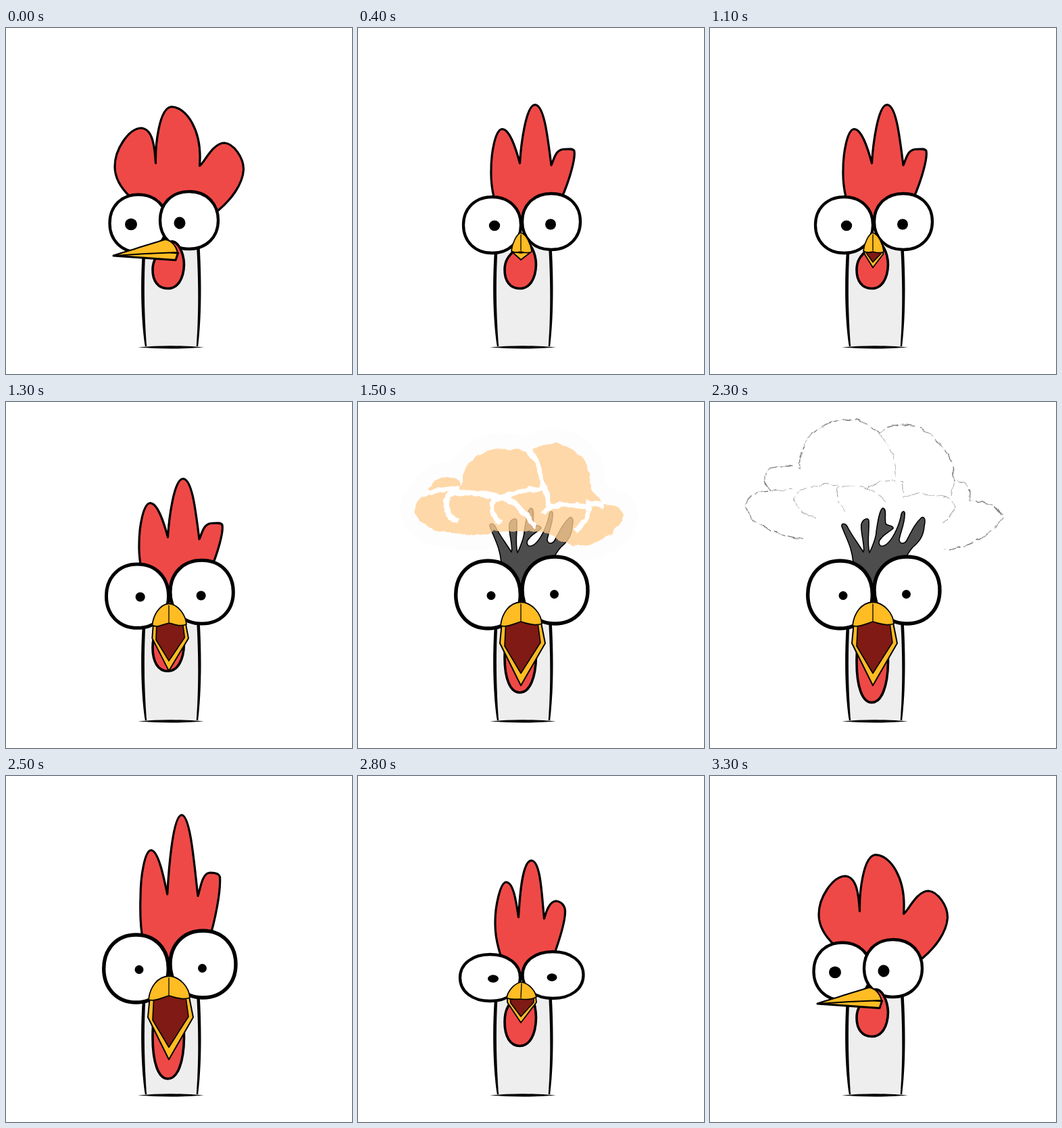
An HTML page for the animation above (4200 ms loop, 512x512 px).

```html
<!DOCTYPE html>
<html lang="en">
<head>
<meta charset="utf-8">
<title>Rooster</title>
<style>
  html, body { margin: 0; width: 100%; height: 100%; overflow: hidden; background: #fff; }
  svg { display: block; width: 100%; height: 100%; }
  .red { fill: #ee4947; stroke: #000; stroke-width: 3.2; stroke-linejoin: round; }
  .beak { fill: #ffbc23; stroke: #000; stroke-linejoin: round; }
  .eye { fill: #fff; stroke: #000; }
  .rim { fill: none; stroke-linejoin: round; }
  #wattle { stroke-width: 3.6; }
  #ridge { fill: none; stroke: #000; stroke-width: 1.3; stroke-linecap: round; }
  #hair { fill: #4d4d4d; stroke: #000; stroke-width: 1.6; stroke-linejoin: round; }
  #mouth { fill: #7f1a14; stroke: #000; stroke-width: 1.6; stroke-linejoin: round; }
</style>
</head>
<body>
<svg viewBox="0 0 512 512">
  <defs>
    <filter id="rough" x="-20%" y="-20%" width="140%" height="140%" color-interpolation-filters="sRGB">
      <feTurbulence type="fractalNoise" baseFrequency=".07" numOctaves="2" seed="4"/>
      <feDisplacementMap in="SourceGraphic" scale="8" xChannelSelector="R" yChannelSelector="G"/>
    </filter>
  </defs>

  <path id="halo" class="rim" stroke="#fdfdfd" stroke-width="46"/>

  <path fill="#eee" d="M204 310 C200 385 202 430 207 471 H283 C287 430 288 385 285 310Z"/>
  <path d="M202 328 C198 390 201 440 205.800 471 L208.200 471 C206 440 203 390 206.500 328Z"/>
  <path d="M286.500 322 C290.500 390 288 440 284.200 471 L281.800 471 C284 440 286 390 282 322Z"/>
  <path d="M195 472.500 Q244 468 293 472.500 Q244 476.500 195 472.500Z"/>

  <path id="comb" class="red"/>
  <path id="hair" d="M212 238 C210 215 203 205 195 184 C194 179 200 179 203 184 C209 196 216 205 227 222
    C230 215 222 190 224 181 C226 173 235 170 235 176 C236 190 232 208 236 223
    C240 215 246 200 246 192 C248 178 251 158 256 157 C262 158 258 172 260 180
    C263 184 272 182 271 187 C266 192 250 200 250 208 C251 216 258 214 264 208
    C272 200 281 180 283 166 C285 160 289 161 288 168 C288 180 281 195 280 204
    C281 211 288 210 291 205 C298 192 303 180 313 171 C318 169 319 175 317 184
    C316 200 308 208 300 215 C294 222 291 226 290 232 L241 285Z"/>

  <path id="eyeL" class="eye"/>
  <path id="eyeR" class="eye"/>
  <ellipse id="pupilL"/>
  <ellipse id="pupilR"/>

  <path id="wattle" class="red"/>
  <path id="jaw" class="beak"/>
  <path id="mouth"/>
  <path id="upper" class="beak"/>
  <path id="ridge"/>

  <g id="cloud" filter="url(#rough)">
    <path id="puff" fill="rgb(255,205,145)"/>
    <path id="gap" class="rim" stroke="#fff"/>
    <path id="edge" class="rim" stroke="#747474"/>
    <path id="fold" class="rim" stroke="#747474"/>
    <path id="fleck" class="rim" stroke="#d6d6d6" stroke-dasharray="14 19 8 27 20 12"/>
  </g>
</svg>

<script>
const LOOP = 4200, STEP = 100;
const $ = id => document.getElementById(id);
const set = (id, attrs) => {
  for (const k in attrs) $(id).setAttribute(k, attrs[k]);
};

// Eyes: cx cy rx ry, pupil x y rx ry. Widths: eye, jaw, upper beak.
const side = {
  comb: "M184 250 C169 236 161 222 161 205 C161 180 181 149 200 148 C217 149 220 175 221.5 200 C221 175 226 118 245 116.5 C266 117 291 150 286.5 204 C293 200 306 170 323 170 C337 171 352 192 351.5 210 C350 232 333 254 314 270 L240 290Z",
  eyeL: "196 289 42.5 42.5 185 290.5 9 8.8",
  eyeR: "271 284.5 43 42.5 257 288.5 8.5 9",
  upper: "M235 313 C220 318 205 322 196 325 C185 329 172 332 159 337 C185 335 220 333 254 332 C251 322 245 314 235 313Z",
  jaw: "M196 327 L180 331 L159 337 L251 343.5 L254.5 333Z",
  mouth: "M215 333 L180 335 L165 336 L245 332 L250 332Z",
  ridge: "M235 313 L165 335",
  widths: "4.3 3 2"
};
const ajar = {
  comb: "M201 250 C198 237 196.5 225 197 210 C197 185 203 150 213.5 149.5 C225 150 234 180 239.5 200 C241 175 248 114 262 113.5 C276 114 281 165 286 203 C290 195 292 180 304 179.5 C312 179 318 178 320 182 C322 192 314 222 302 250 L241 290Z",
  eyeL: "198.5 291.5 42.5 41.5 202 292.5 8.2 7.8",
  eyeR: "286 286.5 43 41.5 285 290.5 8 8",
  upper: "M241 303 C234 305 228 320 227 330 C232 334 237 332 241 331 C247 333 252 334 257 331 C256 320 249 305 241 303Z",
  jaw: "M228 331 L229 335 L241 354.5 L256 335 L256 331Z",
  mouth: "M231 330 L232 334 L241 346.5 L253 334 L253 330Z",
  ridge: "M241 306 L241 329",
  widths: "4.3 1.8 1.7"
};
const front = {
  ...ajar,
  jaw: "M228 331 L230 333 L241 343 L254 333 L256 331Z",
  mouth: "M231 331 L234 332 L241 333 L249 332 L252 331Z"
};
const open = {
  ...ajar,
  eyeL: "192.5 285 47.8 50 197 286.5 6.5 6.5",
  eyeR: "291.5 278.5 48.5 49.5 290.5 284.5 6.5 6.5",
  upper: "M241 296 C224 297 213 312 211 331 C220 334 231 328 241 325 C252 328 262 332 272 328 C271 313 258 297 241 296Z",
  jaw: "M213 325 L210 357 L241 419.5 L277 357 L270 322Z",
  mouth: "M219 322 L217 361 L241 401.5 L270 356 L265 320Z",
  ridge: "M241 299 L241 324",
  widths: "5.4 2 1.8"
};
const tall = {
  ...open,
  comb: "M205 240 C200 215 200 180 201 150 C201 110 208 70 216 70 C226 71 233 120 238 150 C240 110 245 3 258 2 C271 3 277 110 282 152 C285 140 288 108 298 107 C306 107 312 110 313 116 C314 150 306 200 298 240 L241 290Z"
};
const squash = {
  ...ajar,
  comb: "M211 265 C206 250 202.5 235 203 215 C203 195 210 157 219.5 157 C230 158 234 185 237.5 209 C239 185 242 126 256.5 125 C271 126 272 180 275.5 211 C278 203 282 186 293 185 C302 186 307 193 306.5 202 C306 220 297 245 291 262 L241 292Z",
  eyeL: "195.5 298.5 44.5 34.5 200 300 8 5.8",
  eyeR: "288.5 294.5 45 34.5 287 298 7.5 5.8",
  upper: "M241 305 C232 307 222 317 220 328 C226 332 235 330 241 330 C248 331 257 331 264 327 C262 317 252 306 241 305Z",
  jaw: "M221 328 L221 335 L241 365 L264 335 L263 326Z",
  mouth: "M225 328 L226 336 L241 356 L260 335 L260 328Z",
  ridge: "M242 307 L241 328"
};

// Cloud: rim from lower left to lower right, underside, folds between the puffs.
const small = {
  rim: "M150 196 C105 192 85 175 85 158 C85 142 100 138 112 135 C98 132 103 120 120 115 C134 107 146 110 154 124 C152 95 180 70 208 69 C225 70 242 72 254 73 C300 45 344 75 343 118 C343 138 362 140 361 150 C375 150 392 155 392 168 C385 195 355 212 330 212",
  under: "C315 212 295 207 287 196 C280 192 270 190 260 191 C245 193 220 188 200 192 C190 197 170 198 150 196",
  folds: "M148 178 C130 168 128 148 134 138 C150 130 180 136 200 140 M212 180 C198 168 194 150 203 143 C235 138 240 165 264 183 M200 140 C225 143 240 128 276 128 L283 156 M274 166 C285 145 325 152 342 157 C340 170 335 182 322 190 M252 68 C264 85 272 105 274 130 M338 148 L362 153 M100 134 L152 127"
};
const full = {
  rim: "M140 203 C100 198 54 180 54 152 C54 135 80 132 90 132 C75 115 82 92 108 95 C118 92 128 95 133 98 C128 55 165 28 205 25 C230 28 245 40 250 46 C300 10 362 60 362 118 C380 114 388 128 384 146 C410 144 430 158 433 168 C425 195 375 218 345 220",
  under: "C325 220 305 216 295 205 C285 195 275 188 260 188 C240 188 215 188 195 194 C190 202 160 205 140 203",
  folds: "M157 172 C135 168 122 146 126 139 C133 126 165 120 190 123 M203 165 C190 155 184 138 189 126 C215 119 245 128 260 148 M232 129 C245 118 265 114 284 118 L286 137 M285 141 C300 133 340 135 358 145 C364 155 360 170 345 180 M248 46 C265 60 277 90 276 112 M361 118 L357 138 M88 131 L122 129"
};

const poses = [
  [0, side], [400, front], [1000, front], [1100, ajar], [1400, open],
  [2400, open], [2600, tall], [2800, squash], [2950, front], [3300, side], [LOOP, side]
];
const drop = [
  [0, 385.5], [1200, 385.5], [1400, 411], [1500, 430], [1600, 444], [1700, 448.5],
  [1800, 443], [2000, 445], [2400, 444.5], [2500, 448], [2800, 399.5], [3000, 385.5], [LOOP, 385.5]
];
const growth = [[1400, -1], [1500, 0], [1600, .45], [1700, .8], [1800, 1], [2500, 1]];
const tint = [[1400, 1], [1500, .78], [1800, .33], [2000, .17], [2300, 0], [2500, 0]];
const rimWidth = [[1400, 8], [1600, 8], [1800, 7], [2000, 4], [2300, 1.3], [2500, 0]];
const greyness = [[1400, 0], [1500, 0], [1600, .35], [1700, .8], [1800, 1], [2500, 1]];

// Finds the pair of keys around t and the progress between them.
function span(keys, t) {
  let i = 0;
  while (i < keys.length - 2 && t >= keys[i + 1][0]) i++;
  const [t0, a] = keys[i], [t1, b] = keys[i + 1];
  return [a, b, Math.min(1, Math.max(0, (t - t0) / (t1 - t0)))];
}
function value(keys, t) {
  const [a, b, k] = span(keys, t);
  return a + (b - a) * k;
}
// Blends every number in two strings of the same form.
function mix(a, b, k) {
  const nums = b.match(/[\d.]+/g);
  let i = 0;
  return a.replace(/[\d.]+/g, n => +(+n + (nums[i++] - n) * k).toFixed(2));
}

function drawEye(name, text, width) {
  const [cx, cy, rx, ry, px, py, prx, pry] = text.split(" ").map(Number);
  const x = rx * .59, y = ry * .59;
  set("eye" + name, {
    d: `M${cx - rx} ${cy} C${cx - rx} ${cy - y} ${cx - x} ${cy - ry} ${cx} ${cy - ry}
        S${cx + rx} ${cy - y} ${cx + rx} ${cy} S${cx + x} ${cy + ry} ${cx} ${cy + ry}
        S${cx - rx} ${cy + y} ${cx - rx} ${cy}Z`,
    "stroke-width": width
  });
  set("pupil" + name, { cx: px, cy: py, rx: prx, ry: pry });
}

function drawWattle(bottom) {
  const r = 350 + (bottom - 386) * .6, l = 358 + (bottom - 386) * .45;
  const reach = y => y + (bottom - y) * .6;
  set("wattle", {
    d: `M244 316 C254 314 263 332 263.5 ${r} C263 ${reach(r)} 254 ${bottom} 239.5 ${bottom}
        C225 ${bottom} 217 ${reach(l)} 217 ${l} C217 340 226 335 244 316Z`
  });
}

function drawCloud(t) {
  const shown = t >= 1400 && t < 2500;
  $("cloud").style.display = shown ? "" : "none";
  $("halo").style.display = shown && t < 1700 ? "" : "none";
  if (!shown) return;
  const k = value(growth, t), w = value(rimWidth, t), grey = value(greyness, t);
  const part = name => mix(small[name], full[name], k);
  const rim = part("rim"), folds = part("folds"), body = `${rim} ${part("under")}Z`;
  const gap = Math.max(0, t - 1700) / 130;
  const dash = `${30 - gap} ${gap} ${12 + gap} ${gap} 19 ${gap * 1.5}`;
  set("halo", { d: body });
  set("puff", { d: body, opacity: value(tint, t) });
  set("gap", { d: folds, "stroke-width": w, opacity: 1 - grey });
  set("edge", { d: rim, "stroke-width": w, opacity: grey, "stroke-dasharray": dash });
  set("fold", { d: folds, "stroke-width": w * .5, opacity: grey, "stroke-dasharray": dash });
  set("fleck", { d: rim, "stroke-width": w * .6, opacity: grey });
}

function draw(t) {
  const [a, b, k] = span(poses, t);
  const blend = part => mix(a[part], b[part], k);
  const [eyeW, jawW, upperW] = blend("widths").split(" ");
  const burnt = t >= 1400 && t < 2500;
  $("comb").style.display = burnt ? "none" : "";
  $("hair").style.display = burnt ? "" : "none";
  for (const part of ["comb", "upper", "jaw", "mouth", "ridge"]) set(part, { d: blend(part) });
  set("jaw", { "stroke-width": jawW });
  set("upper", { "stroke-width": upperW });
  drawEye("L", blend("eyeL"), eyeW);
  drawEye("R", blend("eyeR"), eyeW);
  drawWattle(value(drop, t));
  drawCloud(t);
}

const start = performance.now();
let last = -1;
function tick() {
  const t = Math.floor(((performance.now() - start) % LOOP) / STEP) * STEP;
  if (t !== last) draw(last = t);
  requestAnimationFrame(tick);
}
tick();
</script>
</body>
</html>
```
